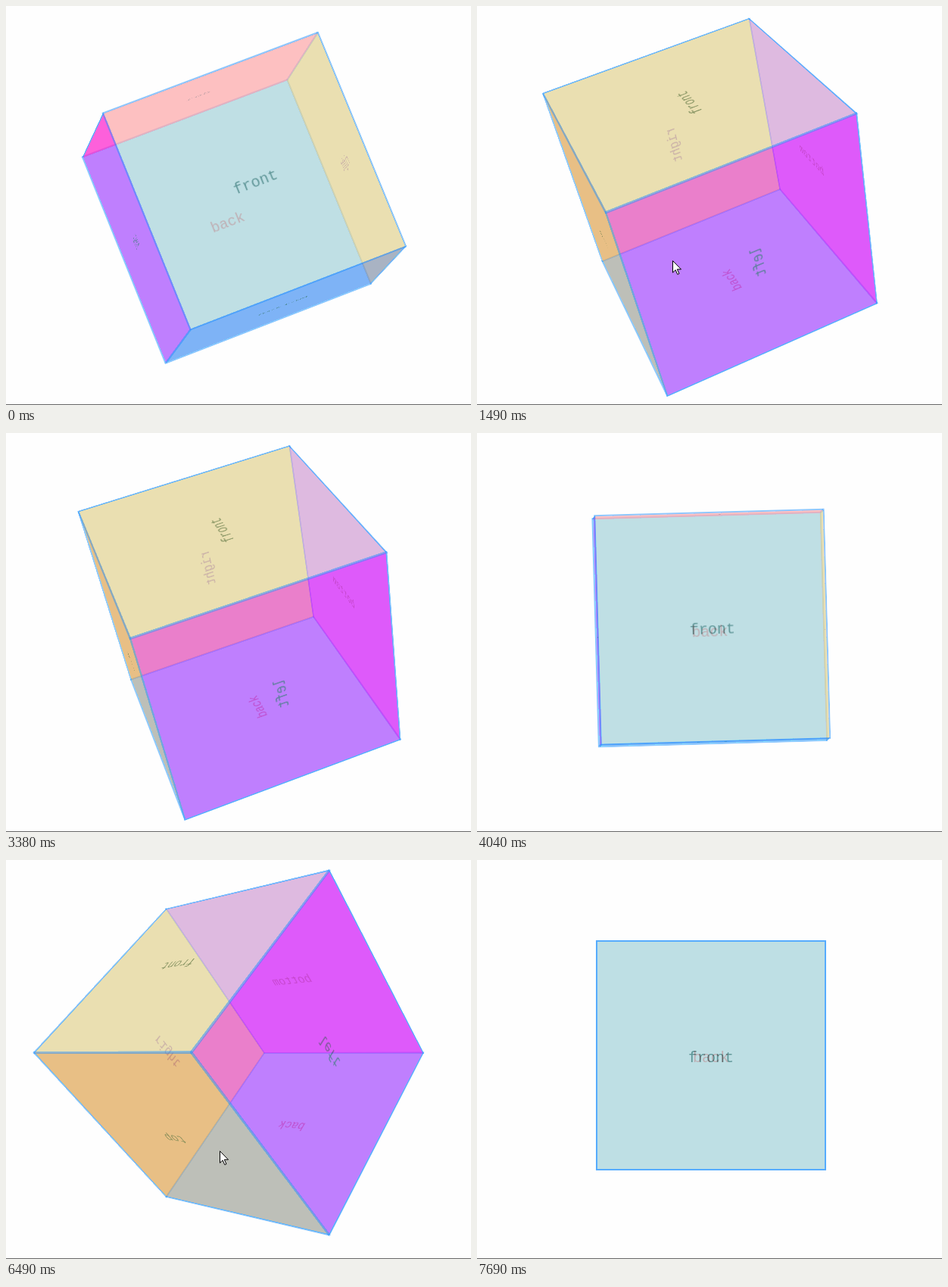
Write an HTML page that moves like this. It is 614x527 px and loops after 7840 ms.

```html
<!DOCTYPE html>
<html lang="en">
<head>
<meta charset="utf-8">
<title>Turning cube</title>
<style>
html, body { margin: 0; width: 100%; height: 100%; overflow: hidden; background: #fefefe; }
.stage { position: relative; width: 614px; height: 527px; overflow: hidden; }
.rule { position: absolute; left: 0; right: 0; bottom: 0; height: 1px; background: #666; }
.cube { position: absolute; left: 157px; top: 106px; width: 300px; height: 300px; transform-style: preserve-3d; }
.face {
  position: absolute; left: 0; top: 0; width: 300px; height: 300px;
  border: 2px solid dodgerblue; opacity: .5; color: rgba(0, 0, 0, .75);
  font: 20px/308px "Liberation Mono", "Courier New", monospace; text-align: center;
}
.front  { background: pink; transform: translateZ(150px); }
.back   { background: aqua; transform: translateZ(-150px); }
.left   { background: fuchsia; transform: translateX(-150px) rotateY(90deg); }
.right  { background: greenyellow; transform: translateX(150px) rotateY(90deg); }
.top    { background: salmon; transform: translateY(-150px) rotateX(90deg); }
.bottom { background: mediumslateblue; transform: translateY(150px) rotateX(-90deg); }
.cursor { position: absolute; left: 0; top: 0; width: 13px; height: 20px; }
</style>
</head>
<body>
<div class="stage">
  <div class="cube">
    <div class="face front">front</div>
    <div class="face back">back</div>
    <div class="face left">left</div>
    <div class="face right">right</div>
    <div class="face top">top</div>
    <div class="face bottom">bottom</div>
  </div>
  <div class="rule"></div>
  <svg class="cursor" viewBox="0 0 13 20">
    <path d="M.5.5v15.6l3.6-3.5 2.7 5.9 2.2-1-2.7-5.7h5.2z" fill="#fff" stroke="#000"/>
  </svg>
</div>
<script>
const LOOP = 7840, STEP = LOOP / 58, TURN = 1000, DEPTH = 900, ANGLE = 163.16;
const cube = document.querySelector('.cube');
const cursor = document.querySelector('.cursor');

// when the cube starts to turn, and whether it opens (1) or returns (0)
const turns = [[-550, 0], [1024, 1], [3195, 0], [4972, 1], [6560, 0]];

// pointer path of each visit: time, x, y
const visits = [
  [[940, 222, 428], [1490, 258, 335], [2970, 258, 335]],
  [[4995, 278, 387], [5270, 295, 305], [5990, 282, 384], [6490, 282, 384], [7180, 38, 290]]
];

// the standard "ease" curve: cubic-bezier(.25, .1, .25, 1)
function ease(x) {
  if (x >= 1) return 1;
  let lo = 0, hi = 1, s;
  for (let i = 0; i < 24; i++) {
    s = (lo + hi) / 2;
    const at = .75 * s * (1 - s) + s ** 3;
    if (at < x) lo = s; else hi = s;
  }
  return .3 * s * (1 - s) ** 2 + 3 * s * s * (1 - s) + s ** 3;
}

function pose(t) {
  const [start, open] = turns.findLast(turn => turn[0] <= t);
  const p = ease((t - start) / TURN);
  return open ? p : 1 - p;
}

function pointer(t) {
  const path = visits.find(v => t >= v[0][0] && t < v.at(-1)[0]);
  if (!path) return null;
  const i = path.findIndex(key => key[0] > t);
  const [t0, x0, y0] = path[i - 1], [t1, x1, y1] = path[i];
  const f = (t - t0) / (t1 - t0);
  return [x0 + (x1 - x0) * f, y0 + (y1 - y0) * f].map(Math.round);
}

// the picture advances in even steps
function draw(now) {
  const t = Math.floor(now % LOOP / STEP + .16) % 58 * STEP;
  const p = pose(t);
  cube.style.transform = p < 1e-4 ? 'none'
    : `perspective(${DEPTH / p}px) rotate3d(.20711, .20711, -.5, ${ANGLE * p}deg)`;
  const at = pointer(t);
  cursor.style.display = at ? 'block' : 'none';
  if (at) cursor.style.transform = `translate(${at[0]}px, ${at[1]}px)`;
}

const begin = performance.now();
function loop() {
  draw(performance.now() - begin);
  requestAnimationFrame(loop);
}
loop();
</script>
</body>
</html>
```
